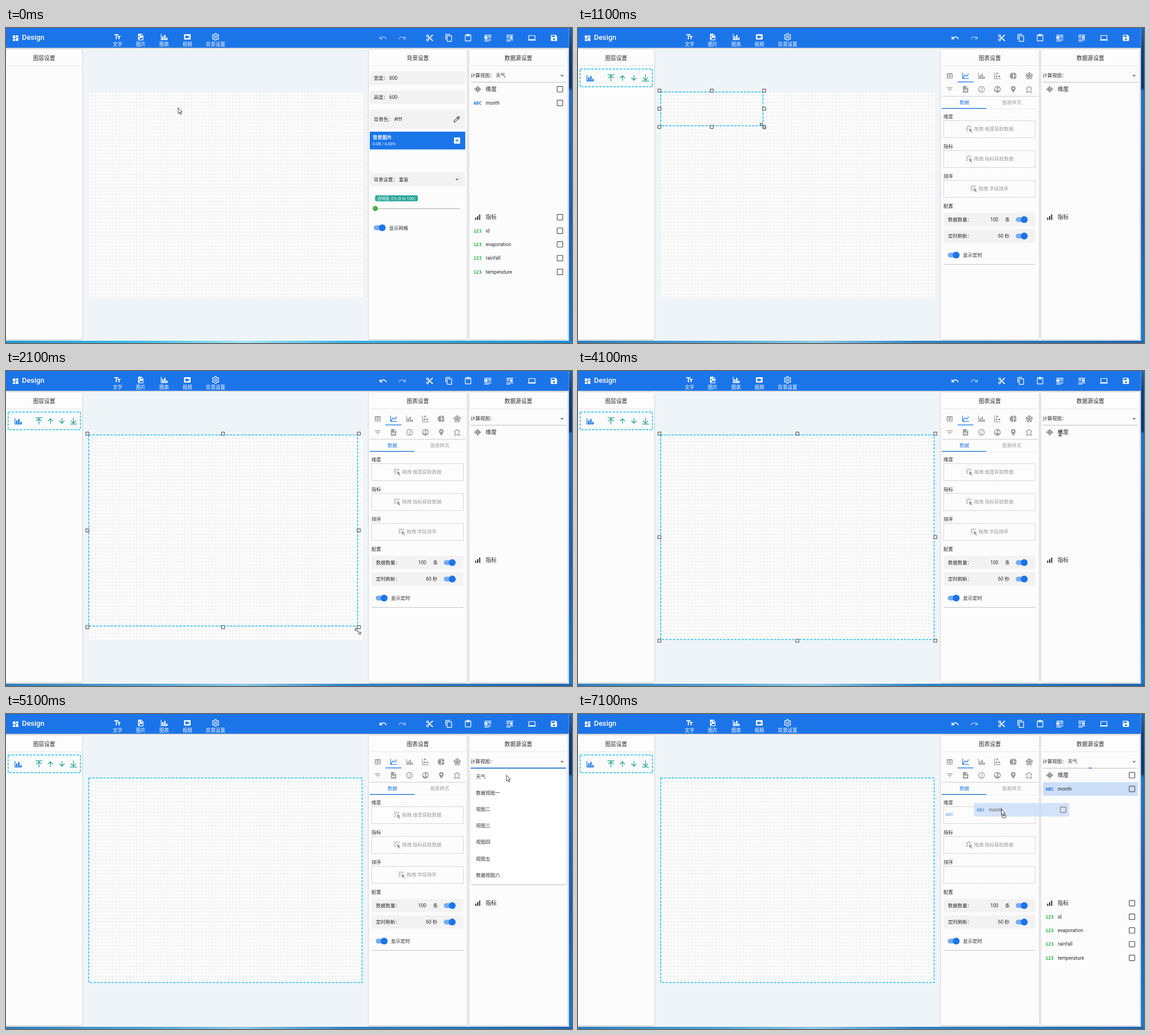
These frames come from a looping animation (1002 by 559 pixels, 8 s). An HTML page:

```html
<!DOCTYPE html>
<html lang="zh-CN">
<head>
<meta charset="utf-8">
<title>Design</title>
<style>
html, body { margin: 0; width: 100%; height: 100%; overflow: hidden; background: #f0f4f7; }
svg { display: block; width: 1002px; height: 559px; }
text { font-family: Roboto, "Noto Sans CJK SC", "Noto Sans CJK", sans-serif; white-space: pre; }
.mono { font-family: "DejaVu Sans Mono", monospace; font-weight: bold; }
</style>
</head>
<body>
<svg id="stage" viewBox="0 0 1002 559">
  <defs>
    <pattern id="grid" x="146" y="113" width="6.075" height="6.075" patternUnits="userSpaceOnUse">
      <path d="M0 .5H6.1M.5 0V6.1" stroke="#f0f0f1" fill="none"/>
    </pattern>
    <linearGradient id="edge" x2="0" y2="1">
      <stop offset="0" stop-color="#1c68bd"/><stop offset=".07" stop-color="#123f7d"/>
      <stop offset=".19" stop-color="#0d3672"/><stop offset=".2" stop-color="#2272c4"/>
      <stop offset=".6" stop-color="#1c5fae"/><stop offset="1" stop-color="#1a7cc9"/>
    </linearGradient>
    <linearGradient id="bright">
      <stop offset="0" stop-color="#1a9bd6"/><stop offset=".25" stop-color="#3fc0e6"/>
      <stop offset=".42" stop-color="#a4e6f6"/><stop offset=".6" stop-color="#35b5e6"/>
      <stop offset="1" stop-color="#168fd4"/>
    </linearGradient>
    <linearGradient id="calm">
      <stop offset="0" stop-color="#2b7fc0"/><stop offset=".25" stop-color="#4fa6d6"/>
      <stop offset=".42" stop-color="#8cc9e8"/><stop offset=".6" stop-color="#2f86c8"/>
      <stop offset="1" stop-color="#1c66b4"/>
    </linearGradient>
    <filter id="shadow" x="-5%" y="-5%" width="110%" height="110%">
      <feDropShadow dx="0" dy=".6" stdDeviation="1" flood-opacity=".35"/>
    </filter>
  </defs>
  <g id="scene"></g>
</svg>
<script>
const BLUE = '#1a75e8', CYAN = '#14bdf5', INK = '#2b2b2b', GRAY = '#9b9b9b', TEAL = '#1a9b8a';

const rect = (x, y, w, h, fill, extra = '') =>
  `<rect x="${x}" y="${y}" width="${w}" height="${h}" fill="${fill}" ${extra}/>`;
const line = (x1, x2, y, color, width = 1) => rect(x1, y, x2 - x1, width, color);
const text = (x, y, s, { size = 8.5, fill = INK, extra = '' } = {}) =>
  `<text x="${x}" y="${y}" font-size="${size}" fill="${fill}" ${extra}>${s}</text>`;
const centred = (x, y, s, opts = {}) => text(x, y, s, { ...opts, extra: 'text-anchor="middle"' });
const circle = (x, y, r, fill) => `<circle cx="${x}" cy="${y}" r="${r}" fill="${fill}"/>`;
const dashed = (x, y, w, h, color, width, dash) =>
  rect(x, y, w, h, 'none', `stroke="${color}" stroke-width="${width}" stroke-dasharray="${dash}"`);

// Icons share a 24-unit box; "solid" ones are filled, "outline" ones stroked.
const solid = {
  dash: 'M3 13h8V3H3zM3 21h8v-6H3zM13 21h8V11h-8zM13 3v6h8V3z',
  font: 'M2 4v3h5v12h3V7h5V4zM21 9h-9v3h3v7h3v-7h3z',
  image: 'M13 9V3.5L18.5 9M6 2a2 2 0 0 0-2 2v16a2 2 0 0 0 2 2h12a2 2 0 0 0 2-2V8l-6-6M6 20h12v-8l-4 4-2-2M8 9a2 2 0 0 0 0 4 2 2 0 0 0 0-4z',
  bars: 'M22 21H2V3h2v16h2v-9h4v9h2V6h4v13h2v-5h4z',
  video: 'M18 16l-4-3.2V16H6V8h8v3.2L18 8m2-4H4a2 2 0 0 0-2 2v12a2 2 0 0 0 2 2h16a2 2 0 0 0 2-2V6a2 2 0 0 0-2-2z',
  undo: 'M12.5 8c-2.65 0-5.05 1-6.9 2.6L2 7v9h9l-3.6-3.6c1.4-1.2 3.1-1.9 5.1-1.9 3.5 0 6.5 2.3 7.6 5.5l2.4-.8C21 11 17.1 8 12.5 8z',
  cut: 'M9.64 7.64A4 4 0 1 0 7.64 9.64L10 12l-2.36 2.36A4 4 0 1 0 9.64 16.36L12 14l7 7h3v-1zM6 8a2 2 0 1 1 0-4 2 2 0 0 1 0 4zM6 20a2 2 0 1 1 0-4 2 2 0 0 1 0 4zM19 3l-6 6 2 2 7-7V3z',
  copy: 'M16 1H4a2 2 0 0 0-2 2v14h2V3h12zM19 5H8a2 2 0 0 0-2 2v14a2 2 0 0 0 2 2h11a2 2 0 0 0 2-2V7a2 2 0 0 0-2-2zM19 21H8V7h11z',
  paste: 'M19 2h-4.2a3 3 0 0 0-5.6 0H5a2 2 0 0 0-2 2v16a2 2 0 0 0 2 2h14a2 2 0 0 0 2-2V4a2 2 0 0 0-2-2zM12 2a1 1 0 1 1 0 2 1 1 0 0 1 0-2zM19 20H5V4h2v3h10V4h2z',
  wrap: 'M2 3h20v2H2zM2 7h9v8H2zM13 7h9v2h-9zM13 11h9v2h-9zM2 17h20v2H2zM2 21h14v1.500H2z',
  wrapRight: 'M2 3h20v2H2zM13 7h7v8h-7zM2 7h9v2H2zM2 11h9v2H2zM2 17h20v2H2zM2 21h12v1.500H2z',
  laptop: 'M20 18a2 2 0 0 0 2-2V6a2 2 0 0 0-2-2H4a2 2 0 0 0-2 2v10a2 2 0 0 0 2 2H0v2h24v-2zM4 6h16v10H4z',
  save: 'M17 3H5a2 2 0 0 0-2 2v14a2 2 0 0 0 2 2h14a2 2 0 0 0 2-2V7zM12 19a3 3 0 1 1 0-6 3 3 0 0 1 0 6zM15 9H5V5h10z',
  line: 'M16 11.8l4.2-7.3 1.8 1-5.3 9-6.5-3.7L5.5 19H22v2H2V3h2v14.500L9.500 8z',
  table: 'M5 4h14a2 2 0 0 1 2 2v12a2 2 0 0 1-2 2H5a2 2 0 0 1-2-2V6a2 2 0 0 1 2-2m0 4v4h6V8zM13 8v4h6V8zM5 14v4h6v-4zM13 14v4h6v-4z',
  scatter: 'M2 2h2v18h18v2H2zM9 11a3 3 0 1 0 .1 0zM11 2a3 3 0 1 0 .1 0zM17.500 11a3 3 0 1 0 .1 0z',
  pie: 'M11 2v20a10 10 0 0 1 0-20m2 0v9h9a10 10 0 0 0-9-9m0 11v9a10 10 0 0 0 9-9z',
  filter: 'M6 13h12v-2H6M3 6v2h18V6M10 18h4v-2h-4z',
  page: 'M6 2a2 2 0 0 0-2 2v16a2 2 0 0 0 2 2h12a2 2 0 0 0 2-2V8l-6-6zM13 3.500L18.500 9H13zM7 12l1.500 7h2l1.500-4 1.500 4h2L17 12h-1.600l-1 4-1.600-4h-1.600l-1.600 4-1-4z',
  globe: 'M12 2a10 10 0 1 0 .1 0zM6 7l4-3 2 3-3 3 3 3-2 5-3-4-3-2zM15 6l4 3 1 4-4 5-1-5-2-2z',
  pin: 'M12 11.500a2.500 2.500 0 1 1 0-5 2.500 2.500 0 0 1 0 5M12 2a7 7 0 0 0-7 7c0 5.250 7 13 7 13s7-7.750 7-13a7 7 0 0 0-7-7z',
  up: 'M4 12l1.400 1.400L11 7.800V20h2V7.800l5.600 5.600L20 12l-8-8z',
  top: 'M4 12l8-8 8 8-1.500 1.400-5.500-5.500V22h-2V7.900l-5.500 5.500zM2 2h20v2H2z',
  signal: 'M3 14h4v8H3zM10 9h4v13h-4zM17 3h4v19h-4z',
  picker: 'M20.700 5.600l-2.300-2.300a1 1 0 0 0-1.400 0l-3.100 3.100L12 4.500 10.600 5.900 12 7.300 3 16.300V21h4.700l9-9 1.400 1.400 1.400-1.400-1.900-1.900 3.100-3.100a1 1 0 0 0 0-1.400zM6.900 19L5 17.100l8-8 1.900 1.900z',
  plus: 'M5 3h14a2 2 0 0 1 2 2v14a2 2 0 0 1-2 2H5a2 2 0 0 1-2-2V5a2 2 0 0 1 2-2m6 4v4H7v2h4v4h2v-4h4v-2h-4V7z',
  pointer: 'M10 9l10 5-4 2 4 5-2 2-4-5-3 3zM8 0h2v6H8zM1 3l1.500-1.500L7 6 5.500 7.500zM0 9h6v2H0zM1 17l4.500-4.500L7 14l-4.500 4.500zM12 6l4-4.500L17.500 3 13.500 7.500z'
};
const outline = {
  gear: 'M10 2h4l.6 3 2 1 3-1 2 3.500-2.400 2v3l2.400 2-2 3.500-3-1-2 1-.6 3h-4l-.6-3-2-1-3 1-2-3.500 2.400-2v-3l-2.400-2 2-3.500 3 1 2-1zM12 9a3 3 0 1 0 .1 0z',
  radar: 'M12 2l10 7-4 12H6L2 9zM12 2v11M22 9l-10 4 6 8M2 9l10 4-6 8M12 6l6 5-3 6H9l-3-6z',
  gauge: 'M12 3a9 9 0 1 0 .1 0M8 17h8M12 14l4-6M6 12h2M12 6v2',
  puzzle: 'M4 7h5c-1-5 6-5 5 0h5v4c-4 0-4 6 0 6v4h-5c0-4-6-4-6 0H4v-5c4 0 4-5 0-5z',
  wave: 'M3 10v4M7.500 6v12M12 2v20M16.500 6v12M21 10v4'
};
function icon(name, x, y, color, size = 14.6, turn = '') {
  const paint = solid[name]
    ? `fill="${color}" fill-rule="evenodd"`
    : `fill="none" stroke="${color}" stroke-width="2"`;
  return `<path transform="translate(${x} ${y}) scale(${size / 24}) ${turn} translate(-12 -12)" d="${solid[name] || outline[name]}" ${paint}/>`;
}

const panel = (x, w, title) =>
  rect(x, 38, w, 514.5, '#fcfcfc', 'rx="2" filter="url(#shadow)"') +
  line(x + 2, x + w - 2, 66.5, '#e6e6e6') + centred(x + w / 2, 56.8, title, { size: 9.8 });
const toggle = (x, y) =>
  rect(x, y - 4.2, 19, 8.4, '#76abf1', 'rx="4.2"') + circle(x + 15, y, 6.1, BLUE);
const caret = (x, y) => `<path d="M${x - 3} ${y - 1.5}h6l-3 3z" fill="#666"/>`;
const checkbox = (x, y) =>
  rect(x - 4.9, y - 4.9, 9.8, 9.8, 'none', 'rx=".8" stroke="#555" stroke-width="1.2"');
const tag = (x, y, s) =>
  text(x, y, s, { size: 7.9, fill: s === 'ABC' ? BLUE : '#1fac3a', extra: 'class="mono"' });
const fieldRow = (x, y, kind, name) =>
  tag(x, y + 3, kind) + text(x + 21.5, y + 3, name, { size: 8.6 }) + checkbox(x + 153, y);

function header(canUndo) {
  const menu = [['font', 197.5, '文字'], ['image', 238.5, '图片'], ['bars', 280, '图表'],
    ['video', 321, '视频'], ['gear', 371, '背景设置']];
  const tools = [['cut', 750], ['copy', 784], ['paste', 818], ['wrap', 853], ['wrapRight', 892],
    ['laptop', 931], ['save', 970]];
  const faded = '#8cbaf3';
  return rect(0, 0, 996, 35, BLUE, 'filter="url(#shadow)"') + icon('dash', 17, 18, '#fff', 13) +
    text(28.3, 21.4, 'Design', { size: 12.8, fill: '#fff', extra: 'font-weight="500"' }) +
    menu.map(([name, x, label]) =>
      icon(name, x, 15.8, '#fff', 14.2) + centred(x, 32, label, { fill: '#fff', size: 8.6 })).join('') +
    icon('undo', 667.5, 17.5, canUndo ? '#fff' : faded) +
    icon('undo', 701.5, 17.5, faded, 14.6, 'scale(-1 1)') +
    tools.map(([name, x]) => icon(name, x, 17.5, '#fff')).join('');
}

function backgroundPanel() {
  const fields = [[77, 24, '宽度： 800'], [111, 24, '高度： 600'], [145, 34, '背景色： #fff'], [256.5, 24.5, '背景设置： 重复']];
  return panel(642, 174, '背景设置') +
    fields.map(([y, h, label]) => rect(644, y, 169, h, '#f2f2f2', 'rx="2"') + text(651, y + h / 2 + 3, label)).join('') +
    icon('picker', 798, 162, '#666') + caret(798.5, 269) +
    rect(644, 184, 169, 31.5, BLUE) +
    text(649, 196.5, '背景图片', { fill: '#fff', extra: 'font-weight="700"' }) +
    text(649, 207.5, '0.0B / 0.00%', { size: 7.3, fill: '#fff' }) + icon('plus', 798.5, 199.7, '#fff') +
    rect(653.5, 297, 75.500, 10.500, '#26a69a', 'rx="2"') +
    text(657, 304.9, '透明度: 0% (0 to 100)', { size: 7.2, fill: '#fff' }) +
    line(654, 803.5, 320, '#b5b5b5', 1.2) + circle(653.8, 320.5, 4.7, '#4caf50') +
    toggle(651, 354.5) + text(678, 357.5, '显示网格');
}

function chartPanel(dragging) {
  const kinds = ['table', 'line', 'bars', 'scatter', 'pie', 'radar', 'filter', 'page', 'gauge', 'globe', 'pin', 'puzzle'];
  const drop = (y, label, hint, x) =>
    text(647, y - 3.7, label) + dashed(647.5, y + .5, 162, 30, '#bdbdbd', 1, '2 1.3') +
    (hint ? icon('pointer', x - 7.500, y + 15.500, GRAY, 14) + text(x, y + 18, hint, { fill: GRAY }) : '');
  return panel(642, 174, '图表设置') +
    kinds.map((name, i) =>
      icon(name, 658 + i % 6 * 28.15, i < 6 ? 84.8 : 108.8, i === 1 ? BLUE : GRAY, 14)).join('') +
    line(672, 700, 95, BLUE, 1.3) + line(644, 814, 120.7, '#c9c9c9') +
    centred(684, 135, '数据', { fill: BLUE }) + centred(768, 135, '图表样式', { fill: GRAY }) +
    line(644, 814, 143, '#ececec') + line(644, 723, 142, BLUE, 1.3) +
    drop(164, '维度', dragging ? '' : '拖拽 维度获取数据', 701) +
    drop(217, '指标', '拖拽 指标获取数据', 701) +
    drop(270, '排序', dragging ? '' : '拖拽 字段排序', 709) +
    text(647, 319, '配置') +
    rect(647.5, 328, 162, 23.5, '#f2f2f2') + rect(647.5, 357, 162, 24, '#f2f2f2') +
    text(655, 342.7, '数据数量：') + text(729.8, 342.7, '100') + text(756, 342.7, '条') + toggle(775, 340) +
    text(655, 371.7, '定时刷新：') + text(743.5, 371.7, '60 秒') + toggle(775, 369.2) +
    toggle(654.5, 403) + text(681.5, 405.8, '显示定时') + line(647.5, 809.5, 419, '#c4c4c4');
}

function dataPanel({ loaded, focus, dragging, menu }) {
  const measures = ['id', 'evaporation', 'rainfall', 'temperature'];
  return panel(820, 174, '数据源设置') +
    text(822.500, 86.8, '计算视图：' + (loaded ? ' 天气' : '')) + caret(984.5, 85) +
    line(822.500, 991.500, 95.7, '#bdbdbd') +
    (focus ? line(907 - focus / 2, 907 + focus / 2, 95.2, BLUE, 1.6) : '') +
    icon('wave', 835, 108.5, INK, 13.5) + text(849, 112, '维度', { size: 9.8 }) +
    icon('signal', 835, 335.5, INK, 12) + text(849, 339, '指标', { size: 9.8 }) +
    (loaded ? checkbox(980.7, 108.6) + checkbox(980.7, 335.7) +
      (dragging ? rect(823, 121, 168.5, 24, '#cddef8') : '') +
      fieldRow(827.7, 133, 'ABC', 'month') +
      measures.map((name, i) => fieldRow(827.7, 359.8 + i * 24.3, '123', name)).join('') : '') +
    (menu ? rect(822.5, 97, 169, 205, '#fff', 'rx="2" filter="url(#shadow)"') +
      ['天气', '数据视图一', '视图二', '视图三', '视图四', '视图五', '数据视图六'].map((s, i) =>
        text(832, 113.5 + i * 29.2, s)).join('') : '');
}

function selection([right, bottom], handles) {
  const left = 146.500, top = 113.500, xs = [left - 2.5, (left + right) / 2 - .3, right + 2],
    ys = [top - 2.5, (top + bottom) / 2 - .3, bottom + 2];
  let out = dashed(left, top, right - left, bottom - top, CYAN, 1.5, '4.2 2.2');
  if (handles) xs.forEach((x, i) => ys.forEach((y, j) => {
    if (i !== 1 || j !== 1) out += rect(x - 2.6, y - 2.6, 5.4, 5.4, '#fff', 'stroke="#444"');
  }));
  return out;
}

const layerItem = () => dashed(3.700, 72.700, 128, 31.500, CYAN, 1.5, '4.2 2.2') +
  icon('bars', 21.500, 89, BLUE, 15) + icon('top', 58.3, 88.700, TEAL, 14.6) + icon('up', 78.700, 88.700, TEAL) +
  icon('up', 99, 88.700, TEAL, 14.6, 'rotate(180)') + icon('top', 119.4, 88.700, TEAL, 14.6, 'rotate(180)');

const cursors = {
  arrow: 'M0 0v10.500l2.400-2.200 1.700 3.700 1.500-.7-1.600-3.600h3.200z',
  resize: 'M-5-5h4l-1.400 1.400 6 6L5 1v4H1l1.400-1.400-6-6L-5-1z',
  move: 'M0-6.500l2.500 2.500H.6v3.400H4v-1.900L6.500 0 4 2.500V.6H.6V4h1.900L0 6.500-2.500 4h1.900V.6H-4v1.900L-6.500 0-4-2.500v1.900h3.400V-4h-1.900z',
  beam: 'M-2.500-4.500h2l.5.5.5-.5h2v.8H.6v7.400h1.900v.8h-2L0 4l-.5.5h-2v-.8h1.900v-7.400h-1.900z'
};
const cursor = ([kind, x, y]) =>
  `<path transform="translate(${x} ${y})" d="${cursors[kind]}" fill="#fff" stroke="#333" stroke-width=".9"/>`;

const dragGhost = () => `<g opacity=".5">${tag(650.500, 181, 'ABC')}</g>` +
  `<g opacity=".75">${rect(701, 158, 168.500, 24, '#c9dbf9')}${fieldRow(705.700, 170, 'ABC', 'month')}</g>` +
  rect(751, 179.500, 6.500, 4.500, '#fff', 'stroke="#444" rx=".5"');

const full = [630.500, 476.500];
const steps = [
  { at: 0, loaded: true, cursor: ['arrow', 304.8, 141.500], strip: 'bright' },
  { at: 100, loaded: true, cursor: ['arrow', 281, 19] },
  { at: 1100, size: [327.500, 173.500], handles: true, cursor: ['resize', 327.500, 174] },
  { at: 2100, size: [622.500, 452.500], handles: true, cursor: ['resize', 623, 462] },
  { at: 3100, size: full, handles: true, cursor: ['move', 543, 365.500] },
  { at: 4100, size: full, handles: true, cursor: ['beam', 853.500, 111] },
  { at: 5100, size: full, focus: 169, menu: true, cursor: ['arrow', 886, 108.500] },
  { at: 6100, size: full, loaded: true, focus: 169, loading: true, cursor: ['arrow', 886, 108.500] },
  { at: 7100, size: full, loaded: true, focus: 5, dragging: true, cursor: ['arrow', 749.500, 169] }
];

const draw = s =>
  rect(0, 0, 1002, 559, '#f3f5f7') + rect(137.500, 40, 501, 513, '#eff4f8') +
  rect(146, 113, 486, 365, '#fdfdfd') + rect(146, 113, 486, 365, 'url(#grid)') +
  rect(996.500, 0, 5.500, 559, 'url(#edge)') + rect(0, 555, 1002, 4, `url(#${s.strip || 'calm'})`) +
  header(s.size) + panel(0, 135, '图层设置') +
  (s.size ? layerItem() + selection(s.size, s.handles) + chartPanel(s.dragging) : backgroundPanel()) +
  dataPanel(s) + (s.dragging ? dragGhost() : '') +
  (s.loading ? rect(0, 0, 980, 1.500, '#f4433c') : '') + cursor(s.cursor);

const scene = document.getElementById('scene');
const start = performance.now();
let shown;
function update(now) {
  const t = Math.max(0, now - start) % 8000;
  const step = steps.findLast(s => s.at <= t);
  if (step !== shown) scene.innerHTML = draw(shown = step);
  requestAnimationFrame(update);
}
update(start);
</script>
</body>
</html>
```
